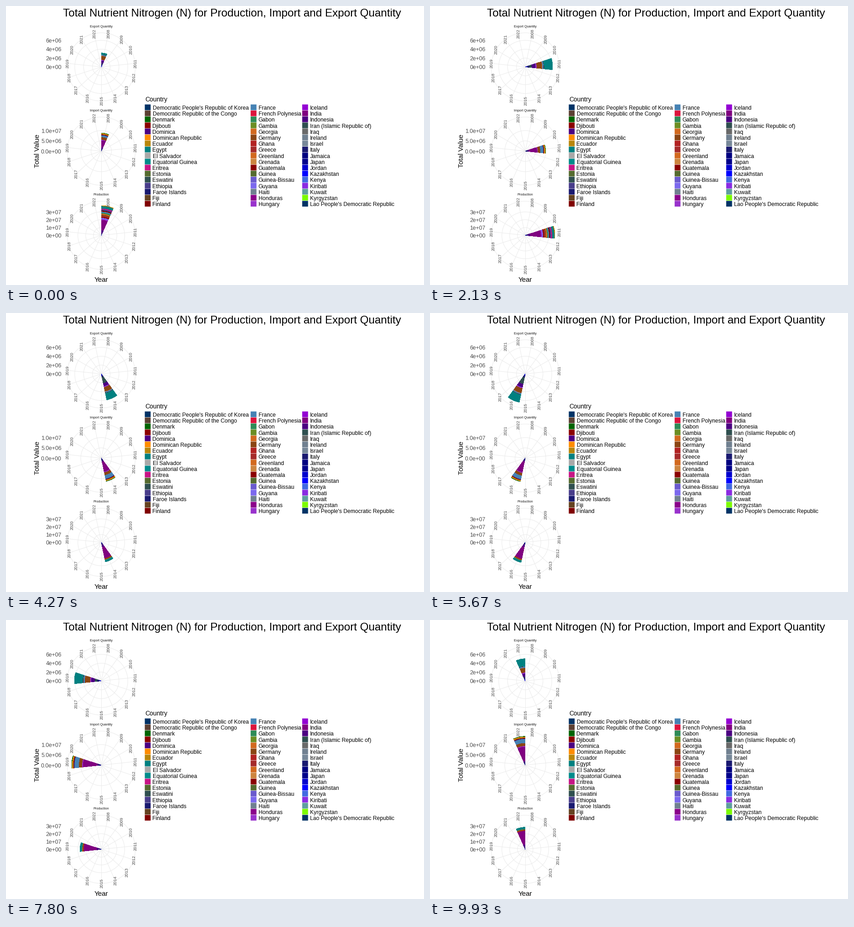
Write a matplotlib script that moves like this. It is 917 px wide and 611 px high and loops after 10 s.

```python
import numpy as np
import matplotlib.pyplot as plt
from matplotlib.animation import FuncAnimation
from matplotlib.patches import Circle, Rectangle, Wedge

W, H, DPI = 917, 611, 64
FRAMES, LOOP = 200, 10000
YEARS = range(2008, 2023)
STEP = 360 / len(YEARS)
CX, RIM = 209, 74.7
GRID, GREY = "#EBEBEB", "#4D4D4D"
KOREA = "Democratic People's Republic of Korea"
IRAN = "Iran (Islamic Republic of)"

# Legend entries, column by column
COUNTRIES = [
    [(KOREA, "#003366"), ("Democratic Republic of the Congo", "#5C4033"),
     ("Denmark", "darkgreen"), ("Djibouti", "darkred"),
     ("Dominica", "indigo"), ("Dominican Republic", "darkorange"),
     ("Ecuador", "darkgoldenrod"), ("Egypt", "teal"),
     ("El Salvador", "darkgray"), ("Equatorial Guinea", "darkcyan"),
     ("Eritrea", "mediumvioletred"), ("Estonia", "darkolivegreen"),
     ("Eswatini", "darkslategray"), ("Ethiopia", "darkslateblue"),
     ("Faroe Islands", "midnightblue"), ("Fiji", "#654321"),
     ("Finland", "maroon")],
    [("France", "steelblue"), ("French Polynesia", "crimson"),
     ("Gabon", "seagreen"), ("Gambia", "olivedrab"),
     ("Georgia", "chocolate"), ("Germany", "saddlebrown"),
     ("Ghana", "firebrick"), ("Greece", "brown"),
     ("Greenland", "chocolate"), ("Grenada", "peru"),
     ("Guatemala", "darkred"), ("Guinea", "darkolivegreen"),
     ("Guinea-Bissau", "slateblue"), ("Guyana", "mediumslateblue"),
     ("Haiti", "slategray"), ("Honduras", "darkmagenta"),
     ("Hungary", "darkorchid")],
    [("Iceland", "darkviolet"), ("India", "purple"),
     ("Indonesia", "indigo"), (IRAN, "darkslategray"),
     ("Iraq", "dimgray"), ("Ireland", "slategray"),
     ("Israel", "lightslategray"), ("Italy", "midnightblue"),
     ("Jamaica", "navy"), ("Japan", "darkblue"), ("Jordan", "mediumblue"),
     ("Kazakhstan", "blue"), ("Kenya", "royalblue"),
     ("Kiribati", "blueviolet"), ("Kuwait", "cadetblue"),
     ("Kyrgyzstan", "lawngreen"),
     ("Lao People's Democratic Republic", "#003366")],
]
COLOR = {name: c for col in COUNTRIES for name, c in col}


# Each rule gives the bar height and its rings, centre outwards,
# t years after the first one.
def exports(t):
    height = np.interp(t, [0, 3, 5, 9, 14], [30.5, 60, 55.5, 66, 48.5])
    return height, {
        "Jordan": 3, "Italy": 4, IRAN: 1 + 14 * np.exp(-((t - 7) / 3.5) ** 2),
        "Indonesia": 7, "Hungary": 2, "Germany": 10, "Georgia": 0.5,
        "France": 2.5, "Finland": 0.5, "Egypt": min(5 + 8 * t, 17)}


def imports(t):
    height = np.interp(t, [0, 2, 4, 10, 11, 14], [39.5, 38, 51, 53, 65, 63])
    thin = dict.fromkeys(["Ethiopia", "Finland", "Ecuador",
                          "Dominican Republic", "Denmark"], 1.3)
    return height, {
        "Japan": 2, "Italy": 3, "Indonesia": 3, "India": 17 + t,
        "Hungary": 1.5, "Germany": 6.5, "France": min(4 + t, 8.5), **thin}


def production(t):
    full = t < 5  # many countries stop reporting after 2012
    height = 65 if full else 40 + 0.6 * t
    names = ["Hungary", "Guyana", "Guatemala", "Greece", "Germany", "Georgia",
             "Gabon", "France", "Finland", "Ethiopia", "Eritrea"]
    late = {"Greece": 1, "Germany": 2, "Georgia": 0.5, "Gabon": 0.5}
    thin = {n: 2.2 if full else late.get(n, 0) for n in names}
    return height, {
        "Jordan": 1, "Italy": 3, "Indonesia": 6, "India": 22 + 0.6 * t,
        **thin, "Egypt": 5, "Ecuador": 1.7 * full}


# title, rule, tick step, tick count, tick format, pixels per tick
PANELS = [("Export Quantity", exports, 2e6, 4, ".0e", 19.4),
          ("Import Quantity", imports, 5e6, 3, ".1e", 22.5),
          ("Production", production, 1e7, 4, ".0e", 17.1)]

plt.rcParams["font.family"] = ["Liberation Sans"]
fig = plt.figure(figsize=(W / DPI, H / DPI), dpi=DPI, facecolor="white")
ax = fig.add_axes([0, 0, 1, 1])
ax.set(xlim=(0, W), ylim=(H, 0))
ax.axis("off")


def pt(px):
    return px * 72 / DPI


def label(x, y, s, px, ha="left", color="black", rot=0):
    """Text whose capitals are centred on the given point's line."""
    off = 0.358 * px
    x, y = (x + off, y) if rot else (x, y + off)
    ax.text(x, y, s, size=pt(px), ha=ha, va="baseline", color=color,
            rotation=rot, rotation_mode="anchor", zorder=5)


def draw_panel(cy, title, step, count, fmt, gap):
    label(CX, cy - 89.3, title, 7.25, "center", "#1A1A1A")
    for i in range(count):
        label(121.5, cy + 0.3 - i * gap, format(i * step, fmt), 12.3,
              "right", GREY)
    for r in [i * gap for i in range(1, count)] + [RIM]:
        ax.add_patch(Circle((CX, cy), r, fill=False, ec=GRID, lw=pt(1)))
    for i, year in enumerate(YEARS):
        a = np.radians((i + 0.5) * STEP)
        x, y = CX + RIM * np.sin(a), cy - RIM * np.cos(a)
        ax.plot([CX, x], [cy, y], color=GRID, lw=pt(1), zorder=1)
        label(x, y, str(year), 9.2, "center", GREY, rot=90)


def draw_bar(cy, rule):
    """One wedge per ring, inner ones on top."""
    wedges = []
    for k, name in enumerate(rule(0)[1]):
        w = Wedge((CX, cy), 1, 0, STEP, fc=COLOR[name], lw=0,
                  antialiased=False, zorder=3 - k / 100)
        wedges.append(ax.add_patch(w))
    return wedges


def draw_legend():
    label(305, 204.5, "Country", 13.9)
    for x, col in zip((304.5, 536.7, 649.8), COUNTRIES):
        for i, (name, color) in enumerate(col):
            y = 222 + 13.2 * i
            ax.add_patch(Rectangle((x, y - 6.4), 12.8, 12.5, fc=color,
                                   lw=0, snap=False))
            label(x + 17, y + 0.6, name, 12.12)


label(125, 14.5, "Total Nutrient Nitrogen (N) for Production, "
      "Import and Export Quantity", 24.23)
label(68, 317, "Total Value", 15, "center", rot=90)
label(CX, 598.5, "Year", 15.1, "center")
draw_legend()

bars = []
for i, (title, rule, *ticks) in enumerate(PANELS):
    cy = 133.4 + 184.4 * i
    draw_panel(cy, title, *ticks)
    bars.append((rule, draw_bar(cy, rule)))

# Years turn over on fifteenths of a second, here in 50 ms frames
STARTS = [int(149 * k / 14 + 0.5) * 4 // 3 for k in range(len(YEARS))]


def update(i):
    t = int(np.searchsorted(STARTS, i, side="right")) - 1
    for rule, wedges in bars:
        height, rings = rule(t)
        edges = np.cumsum(list(rings.values()))
        for w, r in zip(wedges, edges * height / edges[-1]):
            w.set_radius(r)
            w.set_theta1(t * STEP - 90)
            w.set_theta2((t + 1) * STEP - 90)
    return [w for _, wedges in bars for w in wedges]


anim = FuncAnimation(fig, update, frames=FRAMES, interval=LOOP / FRAMES,
                     repeat=True, repeat_delay=0)
plt.show()
```
